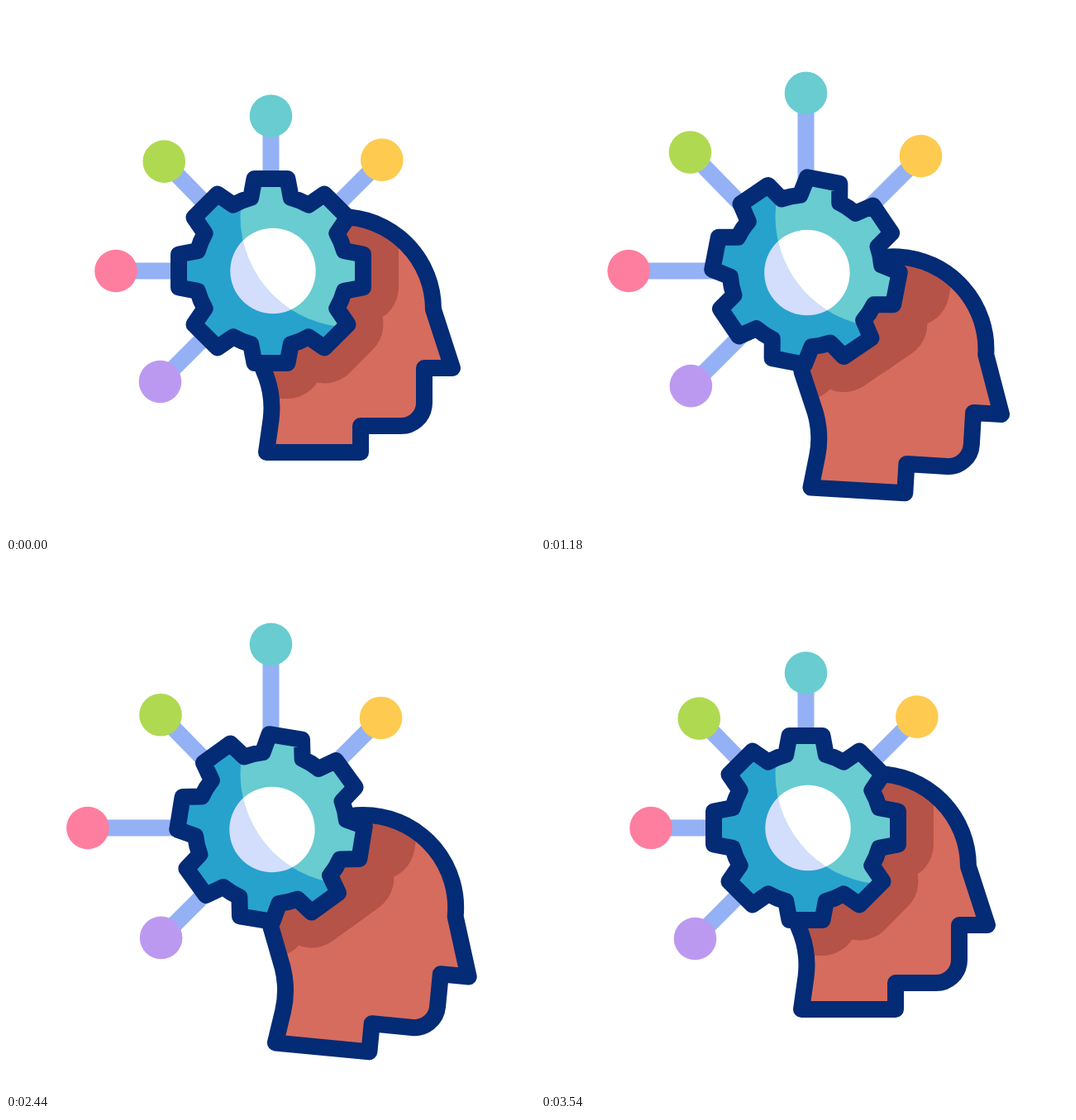
An HTML page that plays this animation: 640x640 px, repeating every 3.6 s.

```html
<!DOCTYPE html>
<html lang="en">
<head>
<meta charset="utf-8">
<title>Thinking gear</title>
<style>
html, body { margin: 0; width: 100%; height: 100%; overflow: hidden; background: #fff; }
svg { display: block; width: 100vw; height: 100vh; }
</style>
</head>
<body>
<svg viewBox="0 0 640 640">
  <defs>
    <path id="gear"/>
    <path id="head"/>
    <clipPath id="inHead"><use href="#head" class="skull"/></clipPath>
    <clipPath id="lit"><circle cx="417" cy="255" r="133.5"/></clipPath>
  </defs>
  <g id="nodes"></g>
  <use href="#head" class="skull" fill="#d66c5d"/>
  <g clip-path="url(#inHead)">
    <g class="spin" fill="#b55348" stroke="#b55348" stroke-width="86" stroke-linejoin="round">
      <use href="#gear"/>
      <use href="#gear" y="-30"/>
    </g>
  </g>
  <use href="#head" class="skull" fill="none" stroke="#042b75" stroke-width="20" stroke-linejoin="round"/>
  <g class="spin"><use href="#gear" fill="#27a2cd"/><circle cx="2.5" r="51.7" fill="#d3ddfc"/></g>
  <g clip-path="url(#lit)">
    <g class="spin"><use href="#gear" fill="#68ccd1"/><circle cx="2.5" r="51.7" fill="#fff"/></g>
  </g>
  <use href="#gear" class="spin" fill="none" stroke="#042b75" stroke-width="20" stroke-linejoin="round"/>
</svg>
<script>
const LOOP = 3600, MID = 320.5, START = 190, BEAT = 601, END = 3396;
const NS = 'http://www.w3.org/2000/svg';
const byId = id => document.getElementById(id);
const all = q => [...document.querySelectorAll(q)];
const set = (el, attrs) => { for (const k in attrs) el.setAttribute(k, attrs[k]); };
const lerp = (a, b, u) => a + (b - a) * u;
const clamp = u => Math.min(1, Math.max(0, u));
const smooth = u => u * u * (3 - 2 * u);
const soft = u => lerp(u, smooth(u), 0.4);
const rad = deg => deg * Math.PI / 180;

// Eight teeth joined by arcs
function gearPath() {
  const base = 88.6, half = 24.3, r = Math.hypot(base, half);
  const tooth = [[-half, -base], [-20, -111.5], [20, -111.5], [half, -base]];
  let d = '';
  for (let i = 0; i < 8; i++) {
    const c = Math.cos(rad(45 * i)), s = Math.sin(rad(45 * i));
    d += (i ? `A${r} ${r} 0 0 1 ` : 'M') + tooth.map(([x, y]) => [x * c - y * s, x * s + y * c]).join('L');
  }
  return d + `A${r} ${r} 0 0 1 ${-half} ${-base}Z`;
}

// The jaw rises by lift while the neck grows
function headPath(lift) {
  const jaw = 508 - lift;
  return `M405 255A112 112 0 0 1 517 367L540 438H506V${jaw - 28}A28 28 0 0 1 478 ${jaw}H429V540H315`
    + 'L320.5 501C323 482 321 466 315 449L296 401Q291 386 293 367A112 112 0 0 1 405 255Z';
}

// Colour, angle, then reach from the centre at rest, on odd and on even beats
const nodes = [
  ['#68ccd1', -90, 187.5, 170.5, 236.5],
  ['#fe7e9f', 180, 187.5, 168, 236.5],
  ['#b0d952', -134.3, 185, 260, 172],
  ['#fecb50', -45, 190, 250, 171],
  ['#bc99f1', 135, 189.5, 252.5, 170]
].map(([color, angle, rest, odd, even]) => {
  const line = document.createElementNS(NS, 'line');
  const dot = document.createElementNS(NS, 'circle');
  const g = byId('nodes').appendChild(document.createElementNS(NS, 'g'));
  g.append(line, dot);
  set(g, { transform: `translate(${MID} ${MID}) rotate(${angle})` });
  set(line, { x1: 70, stroke: '#94b1f5', 'stroke-width': 20 });
  set(dot, { r: 25.8, fill: color });
  return { line, dot, rest, odd, even };
});

// Weights of the odd and the even pose: in from rest, back and forth, out to rest
function sway(t, ease) {
  const n = (t - START) / BEAT, k = Math.floor(n);
  if (n < 1) return [ease(clamp(n)), 0];
  if (n >= 4) return [0, 1 - ease(clamp((t - START - 4 * BEAT) / (END - START - 4 * BEAT)))];
  const u = ease(n - k);
  return k % 2 ? [1 - u, u] : [u, 1 - u];
}

// Cubic easing with a late, short slowdown
function spinEase(x) {
  let lo = 0, hi = 1;
  for (let i = 0; i < 24; i++) {
    const s = (lo + hi) / 2, r = 1 - s;
    if (3 * r * r * s * 0.32 + 3 * r * s * s * 0.86 + s * s * s < x) lo = s; else hi = s;
  }
  return smooth(lo);
}

function headTilt(t) {
  const [odd, even] = sway(t, smooth);
  const out = clamp((t - START - 4 * BEAT) / (END - START - 4 * BEAT));
  return 8.4 * even - 9.4 * odd - 13 * Math.sin(Math.PI * out) ** 2;
}

const spinners = all('.spin'), skulls = all('.skull');
set(byId('gear'), { d: gearPath() });

function draw(t) {
  const angle = 100 * spinEase(clamp((1600 - Math.abs(t - LOOP / 2)) / 1600));
  spinners.forEach(el => set(el, { transform: `translate(${MID} ${MID}) rotate(${angle})` }));

  const tilt = headTilt(t);
  const drop = smooth(clamp((t - 200) / 570)) * smooth(clamp((END - t) / 570));
  set(byId('head'), { d: headPath(drop * (5 - tilt / 2)) });
  const pose = `translate(${12.5 * drop} ${46 * drop}) rotate(${tilt} 372 521)`;
  skulls.forEach(el => set(el, { transform: pose }));

  const [a, b] = sway(t, soft);
  for (const { line, dot, rest, odd, even } of nodes) {
    const reach = rest + a * (odd - rest) + b * (even - rest);
    set(line, { x2: reach });
    set(dot, { cx: reach });
  }
}

const start = performance.now();
function tick(now) {
  draw(Math.max(0, now - start) % LOOP);
  requestAnimationFrame(tick);
}
draw(0);
requestAnimationFrame(tick);
</script>
</body>
</html>
```
